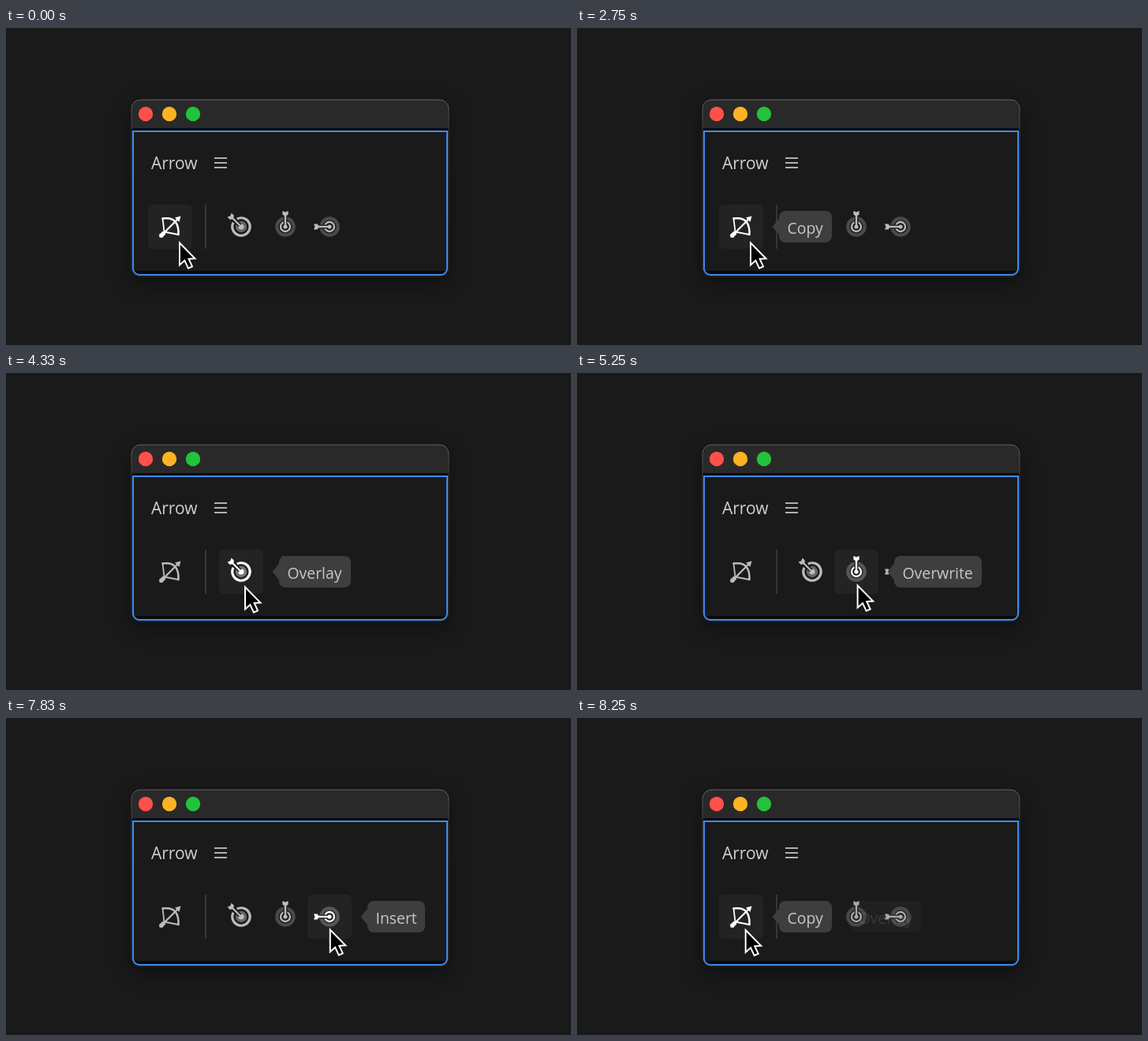
Animation, 716 px wide and 402 px high, one loop 8330 ms. Source, as an HTML page with a canvas:

```html
<!DOCTYPE html>
<html lang="en">
<head>
<meta charset="utf-8">
<title>Arrow panel</title>
<style>
html, body { margin: 0; width: 100%; height: 100%; overflow: hidden; background: #1a1a1a; }
canvas { display: block; }
</style>
</head>
<body>
<canvas id="stage" width="716" height="402"></canvas>
<script>
const ctx = document.getElementById('stage').getContext('2d');
const LOOP = 8330;
const FADE_OUT = 180;
const FONT = '"Open Sans", "Noto Sans", sans-serif';

// Hover spans are [enter, leave] in ms; the pointer rests on Copy before its tooltip opens.
const tools = [
  { label: 'Copy', x: 180, tipWidth: 67, icon: bowIcon, hover: [[0, 3130], [8130, LOOP]], tip: [[2330, 3130], [8130, LOOP]] },
  { label: 'Overlay', x: 270, tipWidth: 91, icon: diagonalTarget, hover: [[3130, 4390], [8010, 8100]] },
  { label: 'Overwrite', x: 326, tipWidth: 111, icon: (c, lit) => sideTarget(c, lit, 0), hover: [[4390, 5530], [7930, 8010]] },
  { label: 'Insert', x: 382, tipWidth: 73, icon: (c, lit) => sideTarget(c, lit, -Math.PI / 2), hover: [[5530, 7930]] }
];

// Pointer moves: start, end, and the position reached.
const startPoint = [219, 270];
const moves = [
  [2830, 3440, 275, 270],
  [4120, 4600, 354.5, 267],
  [5200, 5850, 413, 266],
  [7745, 8285, 212.5, 266.5]
];

const easeInOut = p => p < 0.5 ? 4 * p ** 3 : 1 - (2 - 2 * p) ** 3 / 2;
const clamp01 = v => Math.max(0, Math.min(1, v));

function pointerAt(t) {
  let [x, y] = startPoint;
  for (const [from, to, toX, toY] of moves) {
    const p = easeInOut(clamp01((t - from) / (to - from)));
    x += (toX - x) * p;
    y += (toY - y) * p;
  }
  return [x, y];
}

function isWithin(spans, t) {
  return spans.some(([a, b]) => t >= a && t < b);
}

function tipAlpha(spans, t) {
  return Math.max(...spans.map(([a, b]) =>
    t < a ? 0 : t < b ? 1 : clamp01(1 - (t - b) / FADE_OUT)));
}

function roundRect(x, y, w, h, r) {
  ctx.beginPath();
  ctx.roundRect(x, y, w, h, r);
}

function fillRound(x, y, w, h, r, color) {
  roundRect(x, y, w, h, r);
  ctx.fillStyle = color;
  ctx.fill();
}

function polygon(points) {
  ctx.beginPath();
  points.forEach(([x, y]) => ctx.lineTo(x, y));
  ctx.closePath();
}

function line(points, color, width) {
  ctx.beginPath();
  points.forEach(([x, y]) => ctx.lineTo(x, y));
  ctx.strokeStyle = color;
  ctx.lineWidth = width;
  ctx.stroke();
}

function disc(x, y, r, color) {
  ctx.beginPath();
  ctx.arc(x, y, r, 0, Math.PI * 2);
  ctx.fillStyle = color;
  ctx.fill();
}

function ring(r, width, color, from = 0, to = Math.PI * 2) {
  ctx.beginPath();
  ctx.arc(0, 0, r, from, to);
  ctx.strokeStyle = color;
  ctx.lineWidth = width;
  ctx.stroke();
}

function text(str, x, y, size, color) {
  ctx.font = `${size}px ${FONT}`;
  ctx.fillStyle = color;
  ctx.fillText(str, x, y);
}

// Icons are drawn around their own centre.
function bowIcon(color) {
  ctx.lineCap = ctx.lineJoin = 'round';
  ctx.beginPath();
  ctx.moveTo(-9.5, -10.5);
  ctx.quadraticCurveTo(2, -12, 6.5, -6.5);
  ctx.quadraticCurveTo(11, -1, 10.5, 10);
  ctx.strokeStyle = color;
  ctx.lineWidth = 2.5;
  ctx.stroke();
  line([[-9.5, -10.5], [-7.5, 6.5], [10.5, 10]], color, 1.8);
  line([[-11, 11], [10, -10]], color, 2.3);
  ctx.fillStyle = color;
  polygon([[13.5, -13.5], [6, -11.5], [11.5, -6]]);
  ctx.fill();
  polygon([[-14, 10], [-9, 5.5], [-5.5, 9], [-10, 14], [-13.5, 13.5]]);
  ctx.fill();
}

function fletchedShaft(length, color) {
  line([[0, 0], [0, -length + 3]], color, 2.3);
  ctx.fillStyle = color;
  polygon([[-3.6, -length], [0, -length + 1.5], [3.6, -length], [3.6, -length + 4.5], [0, -length + 7], [-3.6, -length + 4.5]]);
  ctx.fill();
}

function diagonalTarget(color, lit) {
  const up = -Math.PI * 0.75;
  ring(11.2, 3.2, color, up + 0.3, up + Math.PI * 2 - 0.3);
  disc(0, 0, 7.2, lit ? '#777' : '#666');
  disc(0, 0, 3.6, color);
  ctx.rotate(-Math.PI / 4);
  line([[0, -2], [0, -14]], '#1a1a1a', 5);
  fletchedShaft(21, color);
}

function sideTarget(color, lit, angle) {
  ring(10.7, 4.2, lit ? '#565656' : '#4a4a4a');
  ring(6, 2.3, color);
  disc(0, 0, 2.6, color);
  ctx.rotate(angle);
  line([[0, -3], [0, -12]], '#1f1f1f', 5);
  fletchedShaft(20, color);
}

function drawWindow() {
  ctx.save();
  ctx.shadowColor = 'rgba(0,0,0,.4)';
  ctx.shadowBlur = 24;
  ctx.shadowOffsetY = 8;
  fillRound(158, 90, 404, 226, 12, '#080808');
  ctx.restore();

  ctx.save();
  roundRect(159, 91, 402, 224, 11);
  ctx.clip();
  ctx.fillStyle = '#292929';
  ctx.fillRect(159, 91, 402, 36);
  ctx.fillStyle = '#0a0a0a';
  ctx.fillRect(159, 127, 402, 188);
  ctx.fillStyle = '#1a1a1a';
  ctx.fillRect(161, 131, 398, 177);
  ctx.restore();

  roundRect(159, 91, 402, 224, 11);
  const rim = ctx.createLinearGradient(0, 91, 0, 315);
  rim.addColorStop(0, '#686868');
  rim.addColorStop(0.15, '#444');
  rim.addColorStop(1, '#353535');
  ctx.strokeStyle = rim;
  ctx.lineWidth = 1;
  ctx.stroke();

  roundRect(161, 131, 398, 182, [0, 0, 8, 8]);
  ctx.strokeStyle = '#3f8af0';
  ctx.lineWidth = 2;
  ctx.stroke();

  ['#ff5149', '#ffb223', '#22c33a'].forEach((c, i) => disc(177 + 30 * i, 109, 9.2, c));
  text('Arrow', 184, 179, 21, '#d0d0d0');
  ctx.fillStyle = '#b0b0b0';
  for (const y of [164, 170, 176]) ctx.fillRect(264, y, 16, 2);
  ctx.fillStyle = '#363636';
  ctx.fillRect(252, 224, 2, 56);
}

function drawTool(tool, lit) {
  if (lit) fillRound(tool.x, 224, 56, 56, 6, '#232323');
  ctx.save();
  ctx.translate(tool.x + 28, 252);
  tool.icon(lit ? '#fff' : '#bcbcbc', lit);
  ctx.restore();
}

function drawTip(tool, alpha) {
  if (!alpha) return;
  const x = tool.x + 76;
  ctx.save();
  ctx.globalAlpha = alpha;
  ctx.beginPath();
  ctx.roundRect(x, 232, tool.tipWidth, 40, 8);
  ctx.moveTo(x - 8.5, 252);
  ctx.lineTo(x, 242);
  ctx.lineTo(x, 262);
  ctx.closePath();
  ctx.fillStyle = '#3e3e3e';
  ctx.fill();
  text(tool.label, x + 10.5, 261, 19.4, '#c8c8c8');
  ctx.restore();
}

function drawPointer(x, y) {
  ctx.save();
  ctx.translate(x, y);
  polygon([[1, 2.5], [1, 30.5], [7.4, 24.8], [12, 34.7], [17, 32.4], [12.6, 22.8], [20.5, 22.3]]);
  ctx.lineJoin = 'miter';
  ctx.fillStyle = '#000';
  ctx.fill();
  ctx.strokeStyle = '#fff';
  ctx.lineWidth = 2;
  ctx.stroke();
  ctx.restore();
}

function render(t) {
  ctx.fillStyle = '#1a1a1a';
  ctx.fillRect(0, 0, 716, 402);
  drawWindow();
  for (const tool of tools) drawTool(tool, isWithin(tool.hover, t));
  for (const tool of tools) drawTip(tool, tipAlpha(tool.tip || tool.hover, t));
  drawPointer(...pointerAt(t));
}

const began = performance.now();
function tick() {
  render((performance.now() - began) % LOOP);
  requestAnimationFrame(tick);
}
tick();
</script>
</body>
</html>
```
